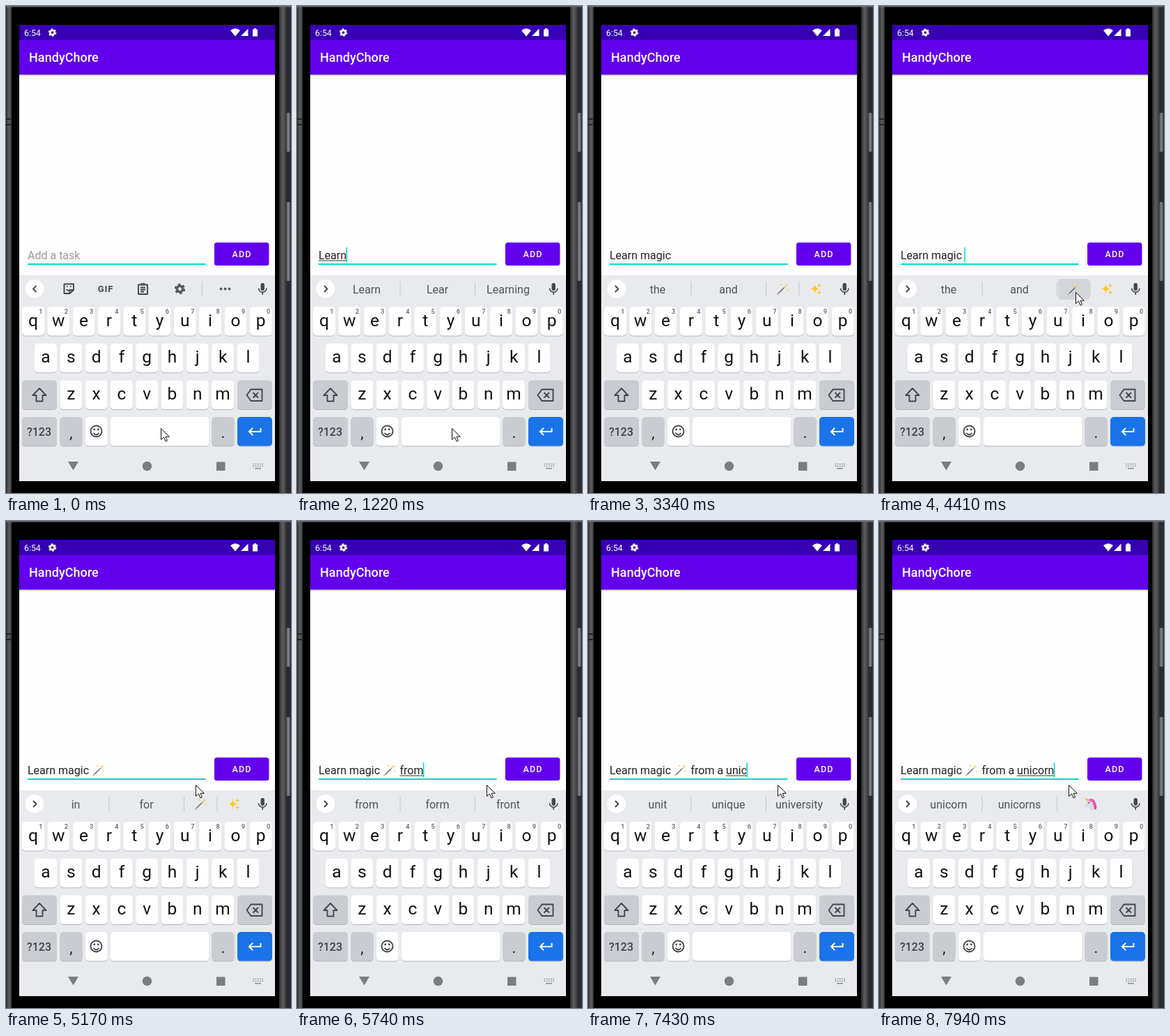
An HTML page for the animation above (8000 ms loop, 409 by 698 pixels).

```html
<!DOCTYPE html>
<html lang="en">
<head>
<meta charset="utf-8">
<title>Task list</title>
<style>
html, body { margin: 0; width: 100%; height: 100%; overflow: hidden; background: #000; }
svg { display: block; width: 100%; height: 100%; }
text { font-family: Roboto, sans-serif; white-space: pre; }
.mid { text-anchor: middle; }
.line { fill: none; stroke: #44474b; stroke-width: 1.9; stroke-linejoin: round; }
</style>
</head>
<body>
<svg id="stage" viewBox="0 0 409 698">
  <defs>
    <linearGradient id="rim"><stop stop-color="#2c2c2e"/><stop offset=".5" stop-color="#5f5f62"/><stop offset="1" stop-color="#3a3a3c"/></linearGradient>
    <linearGradient id="side"><stop stop-color="#3a3a3e"/><stop offset=".5" stop-color="#8a8a8e"/><stop offset="1" stop-color="#4c4c50"/></linearGradient>
    <linearGradient id="shade" x2="0" y2="1"><stop stop-opacity=".22"/><stop offset="1" stop-opacity="0"/></linearGradient>
    <g id="gear"><circle r="4.2" fill="none" stroke="currentColor" stroke-width="3.6"/><circle r="6.4" fill="none" stroke="currentColor" stroke-width="2.6" stroke-dasharray="3.4 3.302"/></g>
    <g id="wand">
      <path d="M-8 8L3-3" stroke="#66625f" stroke-width="1.4"/>
      <path d="M-8 8l2-2M1.500-1.500L3.500-3.500" stroke="#c4c4c4" stroke-width="1.600"/>
      <path d="M5-8l.7 2 2 .7-2 .7-.7 2-.7-2-2-.7 2-.7zM-2-8l.5 1.300 1.300.5-1.300.5-.5 1.300-.5-1.300-1.300-.5 1.300-.5zM7 0l.5 1.300 1.300.5-1.300.5-.5 1.300-.5-1.300-1.300-.5 1.300-.5z" fill="#fdd145"/>
    </g>
    <path id="sparkles" d="M-1.500-6.500Q-.8-.8 5-.2-.8.500-1.500 6.500-2.200.500-8-.2-2.200-.8-1.500-6.500zM5-8q.4 2.600 3 3-2.600.4-3 3-.4-2.600-3-3 2.600-.4 3-3zM5 2q.4 2.600 3 3-2.600.4-3 3-.4-2.600-3-3 2.600-.4 3-3z" fill="#fdc62f"/>
    <g id="unicorn">
      <path d="M-5-4L-9-9-2.500-6z" fill="#f7b928"/>
      <path d="M-3-6Q4-10 7-2 10 4 8 8L0 8Z" fill="#e5499b"/>
      <path d="M-3-6Q3-6 4 0L6 8H-2Q0 5-1 3L-6 5Q-9 5-8 2Z" fill="#dcdce4"/>
      <path d="M-3-6Q1-9 3-4L0-2ZM3-4Q8 0 5 4L3 0Z" fill="#f06eb0"/>
      <circle cx="-2.800" cy="-1.500" r=".9" fill="#333"/>
    </g>
  </defs>

  <rect width="409" height="698"/>
  <rect width="8" height="698" fill="url(#rim)"/>
  <path d="M0 162H7M0 170H7" stroke="#161616" stroke-width="1.500"/>
  <rect x="392" width="10" height="698" fill="url(#rim)"/>
  <rect x="402" width="7" height="698" fill="#2b2b30"/>
  <rect width="409" height="1.500" fill="#6a6a6d"/>
  <rect x="402" y="153" width="6" height="56" rx="2" fill="url(#side)"/>
  <rect x="402" y="281" width="6" height="113" rx="2" fill="url(#side)"/>

  <rect x="19" y="27" width="367" height="21.400" fill="#3700b3"/>
  <rect x="19" y="48.400" width="367" height="50" fill="#6200ee"/>
  <rect x="19" y="98.400" width="367" height="288" fill="#fefefe"/>
  <rect x="19" y="98.400" width="367" height="2.600" fill="url(#shade)"/>
  <rect x="19" y="386" width="367" height="295" fill="#e8eaed"/>

  <g fill="#fff">
    <text x="26" y="42.500" font-size="12.300">6:54</text>
    <use href="#gear" transform="translate(66.500 38) scale(.75)" color="#fff"/>
    <path d="M322 35Q329 29.500 336 35L329 43.500ZM337 43V43L347.500 32.500V43ZM354 33.500H356V32H359V33.500H361V43.500H354Z"/>
    <text x="33" y="80" font-size="18" font-weight="500" letter-spacing=".05">HandyChore</text>
  </g>
  <rect x="299" y="339" width="78.400" height="33" rx="3.500" fill="#6200ee"/>
  <text x="324.500" y="360" font-size="12.500" font-weight="500" letter-spacing="1.100" fill="#fff">ADD</text>
  <rect x="31" y="369" width="255.500" height="2" fill="#03dac5"/>
  <g id="field"></g>

  <circle cx="41" cy="406" r="13.500" fill="#d5d8dc"/>
  <circle cx="41" cy="405.500" r="13.500" fill="#fff"/>
  <g id="strip"></g>
  <g fill="#44474b">
    <rect x="365.500" y="397" width="5.400" height="11" rx="2.700"/>
    <path d="M362.500 404.500a5.700 5.700 0 0 0 11.400 0M368.200 410v4" fill="none" stroke="#44474b" stroke-width="1.600"/>
  </g>

  <g id="keys"></g>
  <g fill="#7b7d80">
    <path d="M89 653H104L96.500 665.500Z"/>
    <circle cx="202.500" cy="659.500" r="6.700"/>
    <rect x="302" y="653.500" width="12.500" height="12.500"/>
  </g>
  <path d="M354.500 656.500H369M354.500 659.500H369" stroke="#8d9094" stroke-width="1.500" stroke-dasharray="1.600 1.600"/>
  <path d="M357 662.800H366" stroke="#8d9094" stroke-width="1.500"/>
  <path id="mouse" d="M0 0V16L4 12.500 6.600 18.500 9 17.400 6.500 11.800H11.800Z" fill="#fff" stroke="#111" stroke-linejoin="round"/>
</svg>

<script>
const LOOP = 8000;
const $ = id => document.getElementById(id);
const pen = document.createElement('canvas').getContext('2d');

// time, text, suggestions, caret, pressed; "*" is the wand, "_" starts the underlined word
const steps = [
  [0, '', '', 0],
  [380, '_L', 'L,Let,Love', 1],
  [510, '_Le', 'Le,Let,Left', 1],
  [640, '_Lea', 'Lea,Leave,Learn', 1],
  [770, '_Lear', 'Lea,Leave,Learn', 1],
  [900, '_Lear', 'Lear,Learn,Learning', 1],
  [1220, '_Learn', 'Learn,Lear,Learning', 1],
  [1370, 'Learn ', 'to,more,about', 1],
  [1500, 'Learn _ma', 'to,more,about', 1],
  [1640, 'Learn _mag', 'mag,mage,magic', 1],
  [1920, 'Learn _magic', 'magi,magic,magical', 1],
  [2220, 'Learn _magic', 'magic,magi,*', 1],
  [2350, 'Learn _magic ', 'magic,magi,*', 1],
  [2630, 'Learn magic ', 'the,and,*', 1],
  [3340, 'Learn magic ', 'the,and,*', 0],
  [3720, 'Learn magic ', 'the,and,*', 1],
  [4410, 'Learn magic ', 'the,and,*', 1, 1],
  [4540, 'Learn magic *', 'the,and,*', 1, 1],
  [4680, 'Learn magic *', 'in,for,*', 1],
  [5170, 'Learn magic *', 'in,for,*', 0],
  [5320, 'Learn magic * _f', 'in,for,*', 1],
  [5460, 'Learn magic * _fr', 'for,from,free', 1],
  [5600, 'Learn magic * _fro', 'fro,from,front', 1],
  [5740, 'Learn magic * _from', 'from,form,front', 1],
  [6140, 'Learn magic * from ', 'the,a,another', 1],
  [6290, 'Learn magic * from a', 'a,an,another', 1],
  [6570, 'Learn magic * from a ', 'spider,soothing,book', 1],
  [6710, 'Learn magic * from a u', 'spider,soothing,book', 1],
  [7130, 'Learn magic * from a _un', 'un,under,until', 1],
  [7265, 'Learn magic * from a _uni', 'uni,unit,university', 1],
  [7400, 'Learn magic * from a _unic', 'unit,unique,university', 1],
  [7535, 'Learn magic * from a _unico', 'unico,unicorn,unicorns', 1],
  [7670, 'Learn magic * from a _unicor', 'unico,unicorn,unicorns', 1],
  [7805, 'Learn magic * from a _unicorn', 'unico,unicorn,unicorns', 1],
  [7940, 'Learn magic * from a _unicorn', 'unicorn,unicorns,#', 1]
];

const mousePath = [
  [0, 222.5, 605.5], [3040, 302, 478], [3190, 394, 288], [3340, 430, 288],
  [3720, 395, 310], [3850, 378, 395], [3980, 341.5, 439],
  [4130, 282.5, 410.5], [4680, 276, 392], [4810, 272.5, 378.5]
];

const at = (list, t) => list.findLast(s => s[0] <= t);
const text = (x, y, s, size, fill, more = '') =>
  `<text x="${x}" y="${y}" font-size="${size}" fill="${fill}" ${more}>${s}</text>`;
const mid = (x, y, s, size, fill, more = '') => text(x, y, s, size, fill, `class="mid" ${more}`);
const box = (x, y, w, h, fill, r = 0) =>
  `<rect x="${x}" y="${y}" width="${w}" height="${h}" rx="${r}" fill="${fill}"/>`;
const icon = (id, x, y) => `<use href="#${id}" x="${x}" y="${y}"/>`;
const line = d => `<path class="line" d="${d}"/>`;
const bar = x => box(x, 395, 1, 21, '#c3c6ca');

function keyboard() {
  const pitch = 36.3, grey = '#c9ccd1';
  const rows = [431, 483.7, 536.4, 589.1];
  const key = (x, r, w, fill = '#fff') =>
    box(x, rows[r] + 1, w, 41.5, '#b4b8bd', 5) + box(x, rows[r], w, 41.5, fill, 5);
  const row = (letters, x, r) => [...letters].map((c, i) =>
    key(x + i * pitch, r, 32) +
    mid(x + 16 + i * pitch, Math.floor(rows[r] + 28), c, 24.5, '#111')).join('');
  const hints = [...'1234567890'].map((c, i) =>
    mid(50 + i * pitch, 441, c, 9.3, '#5b5f64', 'font-weight="500"')).join('');
  return row('qwertyuiop', 23, 0) + hints + row('asdfghjkl', 41, 1) + row('zxcvbnm', 77.3, 2) +
    key(23, 2, 50, grey) + key(332, 2, 50, grey) +
    key(23, 3, 50, grey) + key(77.5, 3, 32, grey) + key(113.7, 3, 32) +
    key(150, 3, 141.5) + key(295.5, 3, 32, grey) + key(332, 3, 50, '#1a73e8') +
    line('M48 548L57.5 558H52.500V566.500H43.500V558H38.500Z') +
    line('M351.500 549.500H367.500V566H351.500L345.500 557.800ZM354.500 554l7.500 7.500M362 554l-7.500 7.500') +
    mid(47.5, 616, '?123', 16, '#3f4246', 'font-weight="500"') +
    mid(93.5, 619, ',', 22, '#222') + mid(311.5, 619, '.', 22, '#222') +
    '<circle class="line" cx="129.500" cy="609.500" r="8"/>' +
    line('M125.300 612Q129.500 617 133.700 612') +
    '<g fill="#44474b"><circle cx="126.700" cy="607" r="1.400"/><circle cx="132.300" cy="607" r="1.400"/></g>' +
    '<path transform="translate(345.500 598)" fill="#fff" d="M19 7v4H5.800l3.600-3.600L8 6l-6 6 6 6 1.400-1.400L5.800 13H21V7z"/>';
}

function toolbar() {
  const dots = [308.5, 314.5, 320.5].map(x => `<circle cx="${x}" cy="405.500" r="1.900" fill="#55595e"/>`).join('');
  return line('M43.500 401L39 405.500L43.500 410') +
    line('M83.500 398.500H97V407L91.500 412H83.500ZM97 407H91.500V412M86.500 406Q89 409 92 406.500M87 402h1.500M92 402h1.500') +
    mid(143, 410, 'GIF', 13, '#55595e', 'font-weight="900" letter-spacing=".8"') +
    line('M190 399.500H203V413H190ZM193 403.500H200M193 406.500H200M193 409.500H198') +
    box(193.5, 397, 6, 3.5, '#55595e') +
    '<use href="#gear" x="249.500" y="405.500" color="#55595e"/>' + bar(281) + dots;
}

function suggestions(words, pressed) {
  if (!words) return toolbar();
  const [a, b, c] = words.split(',');
  const word = (x, s) => mid(x, 412, s, 16, '#505357');
  const last = c === '*' ? icon('wand', 279.5, 405.5) + bar(302.5) + icon('sparkles', 327, 405.5)
    : c === '#' ? icon('unicorn', 303.5, 405.5) : word(303, c);
  return (pressed ? box(257, 391, 45, 30, '#d2d5d9', 4) : '') +
    line('M39 401L43.500 405.500L39 410') +
    word(100, a) + bar(147.5) + word(201.5, b) + bar(255) + last;
}

function widthOf(s) {
  pen.font = '16px Roboto, sans-serif';
  return s.split('*').reduce((w, part, i) => w + pen.measureText(part).width + (i ? 20.5 : 0), 0);
}

function field(raw, caret) {
  if (!raw) return text(31, 363, 'Add a task', 16, '#999');
  const left = 31, base = 363;
  const s = raw.replace('_', '');
  const [before, after] = s.split('*');
  let out = text(left, base, before, 16, '#222');
  if (after !== undefined) {
    out += icon('wand', left + widthOf(before) + 10, 357) +
      text(left + widthOf(before + '*'), base, after, 16, '#222');
  }
  if (raw.includes('_')) {
    const [head, word] = raw.split('_');
    out += box(left + widthOf(head), 364.5, widthOf(word.trim()), 1, '#333');
  }
  return out + (caret ? box(left + widthOf(s) - .5, 346, 1.5, 21.5, '#03dac5') : '');
}

let shown;
function draw(t) {
  const step = at(steps, t);
  if (step !== shown) {
    const [, raw, words, caret, pressed] = shown = step;
    $('field').innerHTML = field(raw, caret);
    $('strip').innerHTML = suggestions(words, pressed);
  }
  const [, x, y] = at(mousePath, t);
  $('mouse').setAttribute('transform', `translate(${x} ${y})`);
}

$('keys').innerHTML = keyboard();
const start = performance.now();
function tick() {
  draw((performance.now() - start) % LOOP);
  requestAnimationFrame(tick);
}
tick();
</script>
</body>
</html>
```
